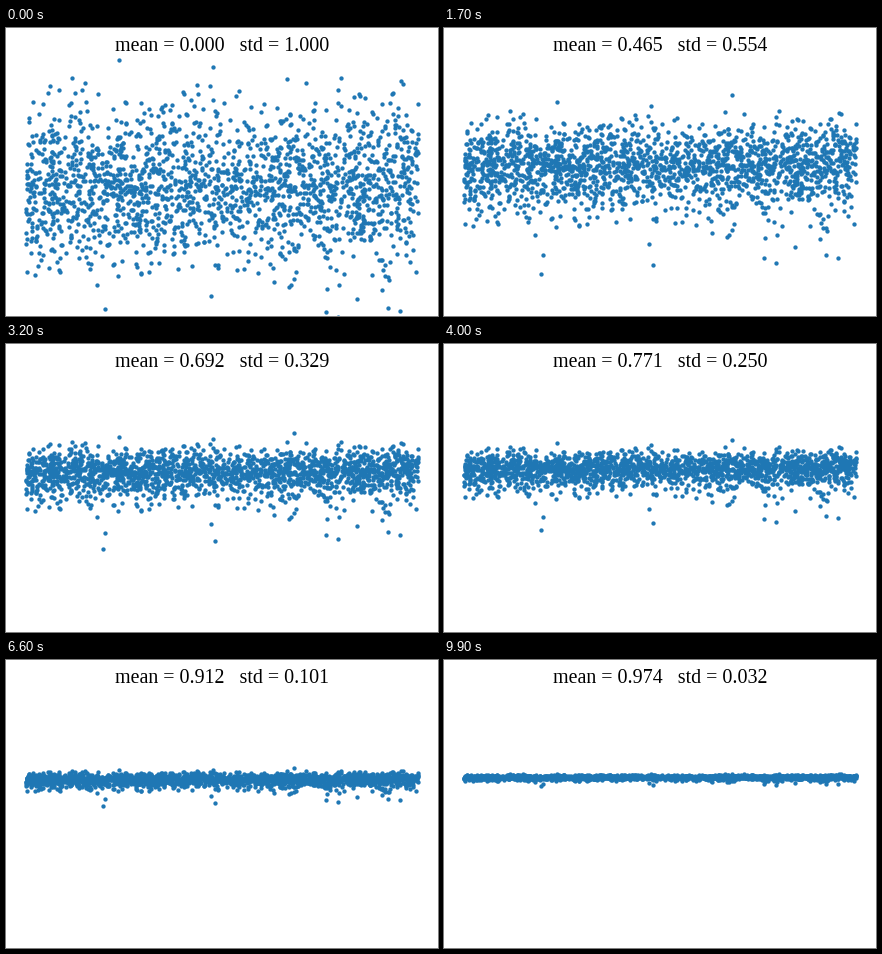
Recreate the animation shown at these times as a matplotlib script. Size 432 px wide and 288 px high, loop 10000 ms.

```python
import numpy as np
import matplotlib.pyplot as plt
from matplotlib.animation import FuncAnimation

W, H, DPI = 432, 288, 72
FRAMES, INTERVAL = 100, 100
COUNT = 2000
TOP = 28                     # upper edge of the plot area, px
UNIT, GOAL_Y = 40, 116       # px per data unit, px height of the value 1
LEFT, RIGHT = 19.6, 412.4
BLUE = "#1f77b4"

# The few points that stand out from the cloud: x in px, start value
EXTREMES = np.array([
    (113, 3.1), (288, 3.48), (207, 2.92),
    (97, -3.65), (99, -3.12), (209, -3.38), (205, -2.8), (320, -3.2),
    (332, -3.32), (351, -2.88), (382, -3.1), (394, -3.18),
])


def make_points(rng):
    y = rng.standard_normal(2 * COUNT)
    y = y[np.abs(y) < 2.7][:COUNT - len(EXTREMES)]
    x = rng.uniform(LEFT, RIGHT, len(y))
    return np.r_[x, EXTREMES[:, 0]], np.r_[y, EXTREMES[:, 1]]


def descend(y, substeps=4):
    """Pull every value towards 1; far low values move at a capped speed."""
    d = y - 1
    path = []
    for i in range(FRAMES):
        path.append(1 + d)
        for _ in range(substeps):
            rate = (.042 - .0001 * i) / substeps
            d = d - rate * d / np.sqrt(1 + (np.minimum(d, 0) / 2.3) ** 2)
    return path


xs, start = make_points(np.random.default_rng(7))
path = descend(start)

plt.rcParams["font.family"] = "Liberation Serif"
fig = plt.figure(figsize=(W / DPI, H / DPI), dpi=DPI, facecolor="white")
ax = fig.add_axes([0, 0, 1, 1 - TOP / H])
ax.set_axis_off()
ax.set_xlim(0, W)
ax.set_ylim(1 - (H - GOAL_Y) / UNIT, 1 + (GOAL_Y - TOP) / UNIT)
dots = ax.scatter(xs, start, s=8, c=BLUE, linewidths=1.5)
label = fig.text(.5, 1 - 23 / H, "", fontsize=20, ha="center", va="baseline")


def update(i):
    dots.set_offsets(np.c_[xs, path[i]])
    mean, std = 1 - np.exp(-.0368 * i), np.exp(-.0347 * i)
    label.set_text(f"mean = {mean:.3f}   std = {std:.3f}")
    return dots, label


anim = FuncAnimation(fig, update, frames=FRAMES, interval=INTERVAL,
                     repeat=True, repeat_delay=0)
plt.show()
```
